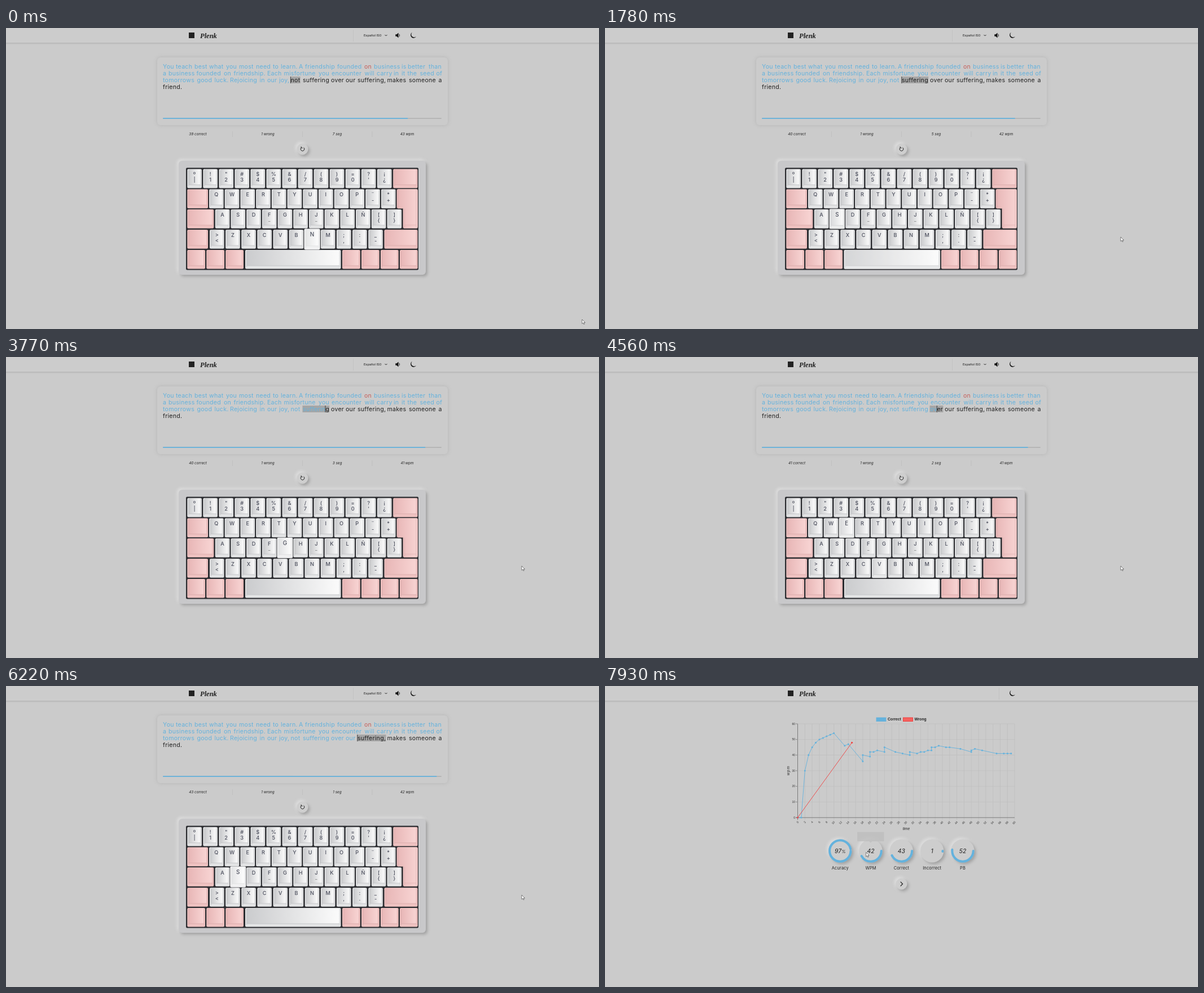
These frames come from a looping animation (1051x533 px, 8000 ms). An HTML page:

```html
<!DOCTYPE html>
<html lang="en">
<head>
<meta charset="utf-8">
<title>Keyboard practice</title>
<style>
  html, body { margin: 0; width: 100%; height: 100%; overflow: hidden; background: #cbcbcb; }
  svg { display: block; width: 1051px; height: 533px; }
  text { font-family: Inter, "Open Sans", sans-serif; fill: #222; white-space: pre; }
  .mid { text-anchor: middle; }
  .copy { font-size: 10.6px; letter-spacing: .25px; }
  .stat { font-size: 6.4px; font-style: italic; text-anchor: middle; }
  .cap { font-size: 9.2px; font-weight: 500; fill: #4b4e5c; text-anchor: middle; }
  .tick { font: 5px "Liberation Sans", Arial, sans-serif; fill: #333; text-anchor: end; }
  .axis { font: italic 6.6px "Liberation Sans", Arial, sans-serif; text-anchor: middle; }
  .legend { font: bold 6.7px "Liberation Sans", Arial, sans-serif; }
  .raised { filter: drop-shadow(3px 3px 2.5px #a0a0a0) drop-shadow(-3px -3px 2.5px #dcdcdc); }
  .card { filter: drop-shadow(0 0 3px #b4b4b4); }
  .key { transform-box: fill-box; transform-origin: center; }
</style>
</head>
<body>
<svg id="stage" viewBox="0 0 1051 533">
  <defs>
    <linearGradient id="white"><stop stop-color="#cbccce"/><stop offset="1" stop-color="#fbfbfb"/></linearGradient>
    <linearGradient id="pink"><stop stop-color="#e8b7b7"/><stop offset="1" stop-color="#f8d4d3"/></linearGradient>
    <clipPath id="plot"><rect x="338" y="64" width="389.5" height="172"/></clipPath>
  </defs>
</svg>
<script>
const LOOP = 8000, RESULTS = 6300;
const BLUE = '#64b2dd', RED = '#c4605c', INK = '#222', BG = '#cbcbcb';
const stage = document.getElementById('stage');
const clamp = v => Math.max(0, Math.min(1, v));

function el(tag, attrs, parent, text) {
  const node = document.createElementNS('http://www.w3.org/2000/svg', tag);
  for (const k in attrs) node.setAttribute(k, attrs[k]);
  if (text !== undefined) node.textContent = text;
  return parent.appendChild(node);
}
const rect = (p, x, y, width, height, fill, more) => el('rect', { x, y, width, height, fill, ...more }, p);
const line = (p, x1, y1, x2, y2, stroke, w = .6) => el('line', { x1, y1, x2, y2, stroke, 'stroke-width': w }, p);
const label = (p, x, y, cls, s, more) => el('text', { x, y, class: cls, ...more }, p, s);
const path = (p, d, more) => el('path', { d, fill: 'none', stroke: INK, ...more }, p);

// Value of a [time, x, y] track at time t, eased between stops
function track(stops, t) {
  let i = 0;
  while (i < stops.length - 2 && t >= stops[i + 1][0]) i++;
  const [a, b] = [stops[i], stops[i + 1]];
  let k = clamp((t - a[0]) / (b[0] - a[0]));
  k = k * k * (3 - 2 * k);
  return [a[1] + (b[1] - a[1]) * k, a[2] + (b[2] - a[2]) * k];
}

// Header
rect(stage, 0, 0, 1051, 26, '#cccccc');
rect(stage, 0, 26, 1051, 1.6, '#b7b7b7');
rect(stage, 0, 27.6, 1051, 1.2, '#c3c3c3');
rect(stage, 324, 8, 10, 10, INK);
label(stage, 344, 17.5, '', 'Plenk', { style: 'font:italic bold 12.5px "Liberation Serif",Times,serif' });
path(stage, 'M719.8 7.8a5.3 5.3 0 1 0 7.2 7.2a4.9 4.9 0 0 1-7.2-7.2z', { fill: '#111', stroke: 'none' });

const game = el('g', {}, stage);
const results = el('g', {}, stage);

// Game header
line(game, 615.5, 3, 615.5, 24, '#bdbdbd');
label(game, 634, 15, '', 'Español ISO', { style: 'font:5.9px Roboto,sans-serif' });
path(game, 'M671.5 12l2 2 2-2', { 'stroke-width': 1 });
path(game, 'M690.3 11.2h2.2l3-2.8v9.2l-3-2.8h-2.2z', { fill: '#111', stroke: 'none' });
path(game, 'M696.8 10.6q1.8 2.4 0 4.8', { 'stroke-width': .9 });

// Text card
rect(game, 268, 52, 515, 120, BG, { rx: 6, class: 'card' });
const mark = rect(game, 504, 86, 18, 12, '#a6a6a6');
const lines = [
  ['You teach best what you most need to learn. A friendship founded on business is better than',
    [278, 301, 334, 360, 390, 413, 443, 473, 487, 519, 530, 587, 635, 652, 701, 712, 749]],
  ['a business founded on friendship. Each misfortune you encounter will carry in it the seed of',
    [278, 288, 337.5, 386, 403.5, 463, 492.5, 554, 577, 635.5, 657, 687, 701, 711.5, 733.5, 762.5]],
  ['tomorrows good luck. Rejoicing in our joy, not suffering over our suffering, makes someone a',
    [278, 338.5, 369.5, 397, 449.5, 463, 484, 504.5, 526, 576, 602, 623, 675.5, 714, 766.5]],
  ['friend.', [278]]
];
const live = [];
lines.forEach(([s, xs], row) => s.split(' ').forEach((word, i) => {
  const y = 72.3 + row * 11.85, active = row === 2 && i > 6 && i < 12;
  const done = row < 2 || (row === 2 && i < 7);
  const fill = done ? (word === 'on' && row === 0 ? RED : BLUE) : INK;
  const text = label(game, xs[i], y, 'copy', active ? '' : word, { style: 'fill:' + fill });
  if (active) live.push({ text, x: xs[i], chars: [...word].map(c => el('tspan', {}, text, c)) });
}));
const caret = rect(game, 504, 86, .9, 12, '#333');
rect(game, 278, 159.2, 494, 1.8, '#b3b3b3', { rx: .9 });
const bar = rect(game, 278, 159.2, 434, 1.8, BLUE, { rx: .9 });

// Counters
const stats = [340, 464, 587, 711].map(x => label(game, x, 190.3, 'stat', ''));
[401.5, 525.5, 649].forEach(x => line(game, x, 183, x, 193, '#bababa'));

function roundButton(p, y) {
  el('circle', { cx: 525.5, cy: y, r: 10, fill: '#cecece', class: 'raised' }, p);
}
roundButton(game, 214.5);
path(game, 'M523.2 212a3.3 3.3 0 1 0 4.4-.2M523.2 209.9v2.4h2.4', { 'stroke-width': 1 });

// Keyboard
rect(game, 306, 235, 438, 202, '#c8c8ca', { rx: 6, class: 'raised' });
rect(game, 319, 247.5, 412, 181, '#2b2c30', { rx: 2 });
const keys = {};

function key(x, y, w, caps, tone = 'white', h = 33.6) {
  const g = el('g', { class: 'key' }, game);
  const pink = tone === 'pink';
  rect(g, x, y, w, h, pink ? '#efc2c1' : '#e3e4e5', { rx: 2 });
  rect(g, x + 2.6, y + .5, w - 5.2, h - 6.4, `url(#${tone})`, { rx: 1.5 });
  const edge = pink ? '#cf9f9f' : '#b2b4b7';
  line(g, x + 2.4, y + 2, x + 2.4, y + h - 3, edge);
  line(g, x + w - 2.4, y + 2, x + w - 2.4, y + h - 3, pink ? '#e0b2b2' : '#cdcfd1');
  line(g, x + 2.6, y + h - 5.7, x + w - 2.6, y + h - 5.7, edge);
  const glow = rect(g, x, y, w, h, '#fff', { rx: 2, stroke: '#fff', 'stroke-width': 1, opacity: 0 });
  [...(caps || '')].forEach((c, i) => label(g, x + w / 2, y + 12.6 + i * 9.8, 'cap', c));
  if (caps === 'F' || caps === 'J') rect(g, x + w / 2 - 1.8, y + 20.8, 3.6, .7, '#777');
  if (caps !== undefined) keys[caps] = { g, glow };
}
function keyRow(y, x, step, caps) {
  caps.split(' ').forEach((c, i) => key(x + i * step, y, 25.6, c));
}
const pinks = (y, list) => list.forEach(([x, w]) => key(x, y, w, undefined, 'pink'));

keyRow(249.8, 321.3, 28.05, 'º| !1 "2 #3 $4 %5 &6 /7 (8 )9 =0 ?\' ¡¿');
pinks(249.8, [[686.2, 43.3]]);
pinks(285.6, [[321.3, 36.7]]);
keyRow(285.6, 360, 27.72, 'Q W E R T Y U I O P ¨- *+');
path(game, 'M695 285.6h32.5a2 2 0 0 1 2 2v65a2 2 0 0 1-2 2h-21.5a2 2 0 0 1-2-2v-33.4h-9a2 2 0 0 1-2-2v-29.6a2 2 0 0 1 2-2z',
  { fill: 'url(#pink)', stroke: '#efc2c1', 'stroke-width': .8 });
path(game, 'M695.5 287v31M706.5 320v33M727 287v66M706.5 349h20.5', { stroke: '#d9a9a9', 'stroke-width': .6 });
pinks(321.2, [[321.3, 47]]);
keyRow(321.2, 370.8, 27.7, 'A S D F G H J K L Ñ [{ ]}');
pinks(357.2, [[321.3, 36.7], [670.5, 59]]);
keyRow(357.2, 361, 28.12, '>< Z X C V B N M ;, :. _-');
pinks(393, [321.3, 355.3, 389.3, 596, 630, 664, 698].map(x => [x, 31.7]));
key(424, 393, 169.5, ' ');

// time, next key, word, letters entered, last letter wrong
const strokes = [
  [-500, 'N', 0, 0], [350, 'O', 0, 1], [910, 'T', 0, 2], [1250, ' ', 0, 3],
  [1690, 'S', 1, 0], [1950, 'U', 1, 1], [2120, 'F', 1, 2], [2330, 'F', 1, 3], [2500, 'E', 1, 4],
  [2620, 'R', 1, 5, true], [3000, 'E', 1, 4], [3150, 'R', 1, 5], [3300, 'I', 1, 6],
  [3480, 'N', 1, 7], [3640, 'G', 1, 8], [3800, ' ', 1, 9],
  [4000, 'O', 2, 0], [4260, 'V', 2, 1], [4470, 'E', 2, 2], [4650, 'R', 2, 3], [4800, ' ', 2, 4],
  [5020, 'O', 3, 0], [5300, 'U', 3, 1], [5480, 'R', 3, 2], [5650, ' ', 3, 3], [5860, 'S', 4, 0]
];

// Results chart
const px = v => 341.5 + v * 6.41, py = v => 233 - v * 2.767;
line(results, 698.5, 3, 698.5, 24, '#bdbdbd');
[[481, BLUE, BLUE, 'Correct'], [528.5, '#f5625f', '#f03030', 'Wrong']].forEach(([x, fill, stroke, s]) => {
  rect(results, x, 56, 17, 6.6, fill, { stroke, 'stroke-width': .8 });
  label(results, x + 20, 61.4, 'legend', s);
});
for (let v = 0; v <= 60; v += 2) {
  const x = px(v);
  line(results, x, 67, x, 237, v ? '#b9b9b9' : '#666', v ? .55 : .8);
  label(results, 0, 0, 'tick', v, { transform: `translate(${x + 2} 241) rotate(-50)` });
}
for (let v = 0; v <= 60; v += 10) {
  const y = py(v);
  line(results, 338, y, 726, y, v ? '#b9b9b9' : '#666', v ? .55 : .8);
  line(results, 338, y, 341.5, y, '#666');
  label(results, 337, y + 1.7, 'tick', v);
}
label(results, 0, 0, 'axis', 'wpm', { transform: 'translate(327 149.5) rotate(-90)', 'letter-spacing': 1 });
label(results, 534, 254.5, 'axis', 'time');

const correct = `0,0 1,0 2,30 3,40 4,45 5,48 6,50 7,51 8,52 9,53 10,54 13,46 14,47 18,36 18,40 20,39 20,42
  21,42 22,43 24,42 24,45 27,42 29,41 31,40 31,42 33,41 34,42 35,42 36,43 37,43 37,45 38,45 39,46
  41,45 42,45 45,44 48,42 48,43 49,44 51,43 55,41 57,41 58,41 59,41`;
const plot = el('g', { 'clip-path': 'url(#plot)' }, results);
const series = [[correct, BLUE], ['0,0 15,48', '#f04040']].map(([s, color]) => {
  const data = s.trim().split(/\s+/).map(p => p.split(',').map(Number));
  return {
    data,
    curve: el('polyline', { fill: 'none', stroke: color, 'stroke-width': .9 }, plot),
    dots: data.map(() => el('circle', { r: 1.5, fill: color }, plot))
  };
});

// Gauges
const gauges = [['Acuracy', 97], ['WPM', 42], ['Correct', 43], ['Incorrect', 1], ['PB', 52]].map(([name, value], i) => {
  const x = 416.8 + i * 54.3;
  el('circle', { cx: x, cy: 292, r: 20.6, fill: '#cdcdcd', class: 'raised' }, results);
  const ring = el('circle', { cx: x, cy: 292, r: 18.7, fill: 'none', stroke: BLUE, 'stroke-width': 4,
    'stroke-linecap': 'round', pathLength: 100 }, results);
  const num = label(results, x, 295.6, 'mid', value, { style: 'font-size:10.4px;font-style:italic' });
  if (!i) el('tspan', { style: 'font-size:7.5px' }, num, '%');
  label(results, x, 325.3, 'mid', name, { style: 'font-size:7.5px;letter-spacing:.1px' });
  return { ring, value };
});
roundButton(results, 350.5);
path(results, 'M523.7 346.6l3.8 3.9-3.8 3.9', { 'stroke-width': 1.3 });
const tip = path(results, 'M447 258.5h47.5v16.5h-21l-2.7 2.5-2.7-2.5h-21z', { fill: '#bfbfbf', stroke: 'none' });

const pointer = path(stage, 'M0 0v7.6l1.8-1.6 1.2 2.7 1.3-.6-1.2-2.5h2.4z',
  { fill: '#fff', stroke: '#333', 'stroke-width': .6 });
const mouse = [[100, 1021, 516], [760, 914, 370], [6960, 914, 370], [7420, 474, 300],
  [7560, 468, 298], [7760, 612, 300], [7930, 462.7, 294.5]];

function drawGame(t) {
  const now = strokes.filter(e => e[0] <= t).pop();
  const [, , word, count, wrong] = now;
  live.forEach(({ chars }, w) => chars.forEach((c, i) => {
    const entered = w < word || (w === word && i < count);
    c.style.fill = !entered ? INK : wrong && w === word && i === count - 1 ? RED : BLUE;
  }));
  const { text, x, chars } = live[word];
  const width = text.getComputedTextLength();
  mark.setAttribute('x', x - .5);
  mark.setAttribute('width', width + .8);
  caret.setAttribute('x', x - .6 + (count < chars.length ? text.getStartPositionOfChar(count).x - x : width));
  bar.setAttribute('width', 434.3 + t * 494 / 60000);

  const wpm = t < 1690 ? 43 : t < 2300 ? 42 : t < 5860 ? 41 : 42;
  [39 + word + ' correct', '1 wrong', 7 - Math.floor((t + 700) / 1000) + ' seg', wpm + ' wpm']
    .forEach((s, i) => stats[i].textContent = s);

  const level = {};
  strokes.forEach(([at, k], i) => {
    const end = i + 1 < strokes.length ? strokes[i + 1][0] : LOOP;
    level[k] = (level[k] || 0) + clamp((t - at) / 150) - clamp((t - end) / 150);
  });
  for (const k in level) {
    keys[k].g.style.transform = `scale(${1 + level[k] * (k === ' ' ? .012 : .08)})`;
    keys[k].glow.setAttribute('opacity', level[k] * .5);
  }
}

function drawResults(t) {
  const fill = clamp((t - RESULTS) / 1000), rest = (1 - fill) ** 4;
  series.forEach(({ data, curve, dots }) => {
    const pts = data.map(([x, y]) => [px(x * (1 + 1.56 * rest)), py(y * (1 - rest))]);
    curve.setAttribute('points', pts.join(' '));
    pts.forEach(([x, y], i) => {
      dots[i].setAttribute('cx', x);
      dots[i].setAttribute('cy', y);
    });
  });
  gauges.forEach(({ ring, value }) => ring.setAttribute('stroke-dasharray', `${value * fill} 200`));
  tip.setAttribute('opacity', clamp((t - 7450) / 150) * .8);
}

function draw() {
  const t = performance.now() % LOOP, over = t >= RESULTS;
  game.style.display = over ? 'none' : '';
  results.style.display = over ? '' : 'none';
  (over ? drawResults : drawGame)(t);
  pointer.setAttribute('transform', `translate(${track(mouse, t)})`);
  requestAnimationFrame(draw);
}
draw();
</script>
</body>
</html>
```
